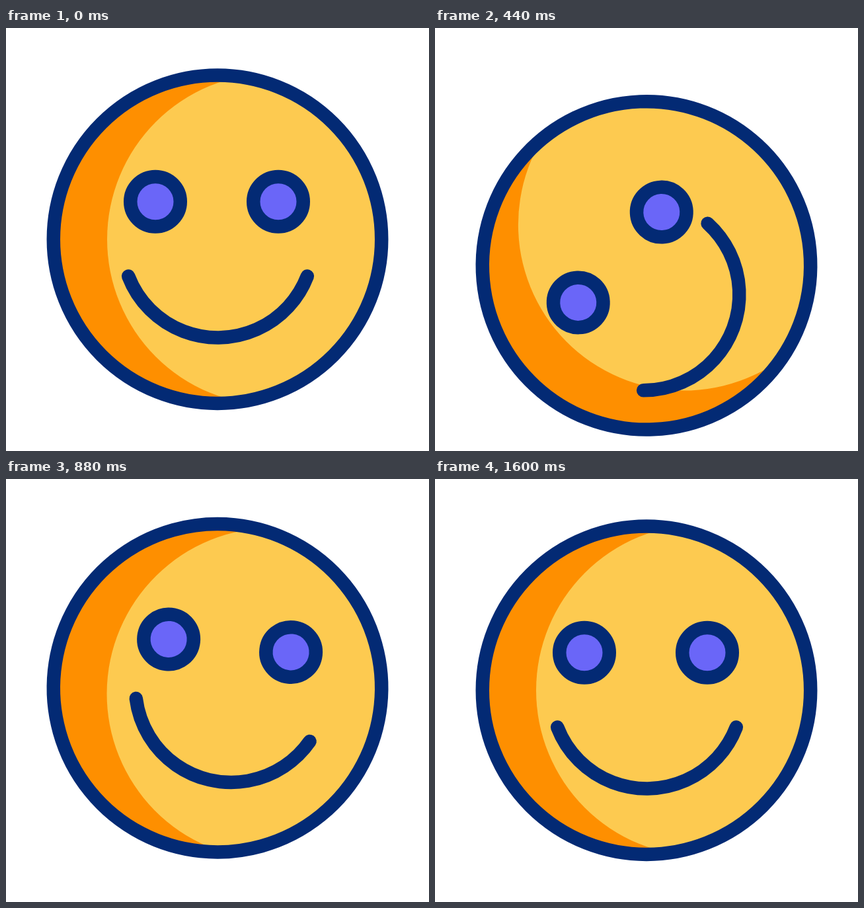
These frames come from a looping animation (640 px wide and 640 px high, 2 s). An HTML page with a canvas:

```html
<!DOCTYPE html>
<html lang="en">
<head>
<meta charset="utf-8">
<title>Wobbling smiley</title>
<style>
  html, body { margin: 0; width: 100%; height: 100%; overflow: hidden; background: #fff; }
  canvas { display: block; width: 640px; height: 640px; }
</style>
</head>
<body>
<canvas id="stage" width="640" height="640"></canvas>
<script>
const ctx = document.getElementById('stage').getContext('2d');
const LOOP = 2000, STEP = 40;
const NAVY = '#032a74', YELLOW = '#fdca50', ORANGE = '#fe8f00', PURPLE = '#6a66f8';
const LINE = 20.5;
const DEG = Math.PI / 180;

// All parts swing to the same beats (ms), some a little early or late.
const BEATS = [0, 455, 740, 980, 1220, 1520];

const ease = u => u * u * (3 - 2 * u);

// Swings from rest through one peak per beat and back to rest.
function swing(t, ...peaks) {
  const next = BEATS.findIndex(beat => beat > t);
  if (t <= 0 || next < 0) return 0;
  const from = peaks[next - 2] || 0, to = peaks[next - 1] || 0;
  const u = (t - BEATS[next - 1]) / (BEATS[next] - BEATS[next - 1]);
  return from + (to - from) * ease(u);
}

function ellipse(x, y, rx, ry = rx) {
  ctx.beginPath();
  ctx.ellipse(x, y, rx, ry, 0, 0, 2 * Math.PI);
}

function fill(color) {
  ctx.fillStyle = color;
  ctx.fill();
}

function drawHead() {
  ctx.save();
  ellipse(0, 0, 248.2);
  ctx.clip();
  fill(ORANGE);
  ellipse(84, 0, 251);
  fill(YELLOW);
  ctx.restore();
  ellipse(0, 0, 248.2);
  ctx.stroke();
}

function drawEye(x, open) {
  ellipse(x, -57, 37.75, 37.75 * open);
  fill(PURPLE);
  ctx.stroke();
}

function drawMouth(tilt) {
  ctx.save();
  ctx.translate(0.5, 55);
  ctx.rotate(tilt * DEG);
  ctx.beginPath();
  ctx.arc(0, -51.2, 145, 21 * DEG, 159 * DEG);
  ctx.stroke();
  ctx.restore();
}

function draw(t) {
  const late = t - 60, early = t + 20;
  const open = 1 - 0.63 * ease(Math.max(0, 1 - Math.abs(t - 1080) / 120));

  ctx.fillStyle = '#fff';
  ctx.fillRect(0, 0, 640, 640);
  ctx.strokeStyle = NAVY;
  ctx.lineWidth = LINE;
  ctx.lineCap = 'round';

  ctx.save();
  ctx.translate(320, 319.7 + swing(t, 39.8, -35.5, 15.8));
  ctx.rotate(swing(t, -47.5, 47.5, -19, 2.8) * DEG);
  drawHead();
  ctx.translate(swing(late, -18.5, 20.3, -8.6, -2.5), swing(late, 20.5, -16, 12.5, 2.8));
  drawEye(-94, open);
  drawEye(92, open);
  drawMouth(t > 0 ? swing(early, -21.6, 11.5, 6.6, 1.6) : 0);
  ctx.restore();
}

const start = performance.now();
function tick() {
  const t = (performance.now() - start) % LOOP;
  draw(Math.floor(t / STEP) * STEP);
  requestAnimationFrame(tick);
}
tick();
</script>
</body>
</html>
```
